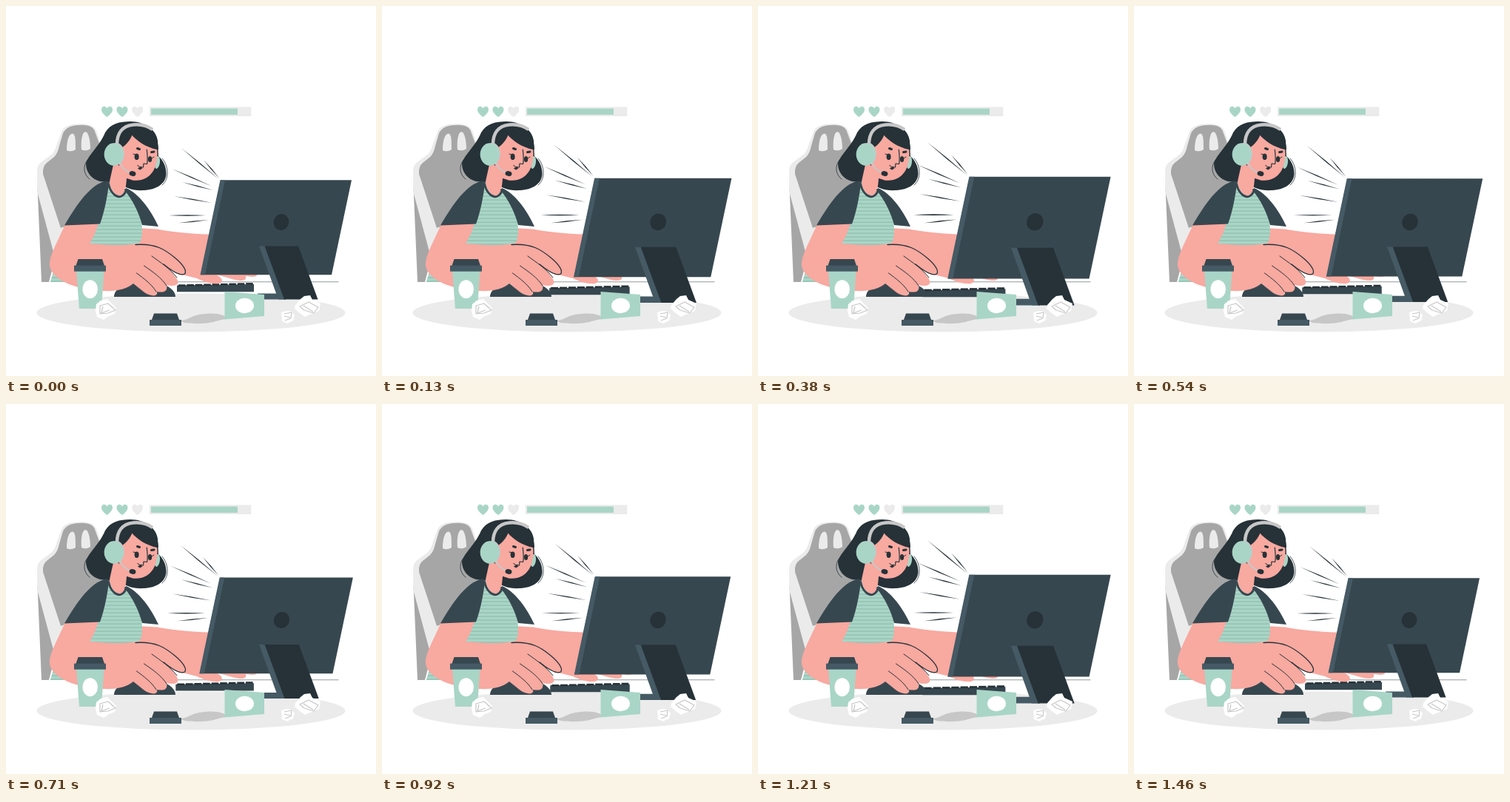
An HTML page for the animation above (1.5 s loop, 500 by 500 pixels).

```html
<!DOCTYPE html>
<html lang="en">
<head>
<meta charset="utf-8">
<title>Gamer at the desk</title>
<style>
  html, body { margin: 0; width: 100%; height: 100%; overflow: hidden; background: #fff; }
  svg { display: block; width: 100vw; height: 100vh; }
  .ink { fill: #263238; }
  .dark { fill: #37474f; }
  .slate { fill: #455a64; }
  .skin { fill: #f8a9a0; }
  .mint { fill: #a9d5c7; }
  .grey { fill: #a6a6a6; }
  .mid { fill: #c7c7c7; }
  .pale { fill: #ebebeb; }
  .white { fill: #fff; }
  .line { fill: none; stroke: #263238; stroke-width: 1; stroke-linecap: round; stroke-linejoin: round; }
  .fold { fill: none; stroke: #c7c7c7; stroke-width: 1.2; stroke-linejoin: round; }
</style>
</head>
<body>
<svg viewBox="0 0 500 500" xmlns="http://www.w3.org/2000/svg">
  <defs>
    <path id="heart" d="M0 7.4C-4 4-7.5 1-7.5-2.8C-7.5-7.6-1.8-8.4 0-4.2C1.8-8.4 7.5-7.6 7.5-2.8C7.5 1 4 4 0 7.4Z"/>
    <pattern id="stripes" width="10" height="5" patternUnits="userSpaceOnUse">
      <rect class="mint" width="10" height="5"/>
      <rect y="1.5" width="10" height="1.2" fill="#8fbdae"/>
    </pattern>
  </defs>

  <ellipse class="pale" cx="250" cy="414.5" rx="208.5" ry="26"/>

  <!-- status -->
  <use href="#heart" class="mint" x="136.5" y="142.7"/>
  <use href="#heart" class="mint" x="157" y="142.7"/>
  <use href="#heart" class="pale" x="177.7" y="142.7"/>
  <rect class="pale" x="193.7" y="136.4" width="137.6" height="12.6"/>
  <rect class="mint" x="196" y="138.5" width="117" height="8.4"/>

  <!-- chair -->
  <path class="grey" d="M42.5 245L48 373H58L72 320L62 270Z"/>
  <path class="pale" d="M42 240V224Q42 214 49 210L61 201Q66 197 68 189L75 170Q79 160 97 159.500Q117 158 122 168L142 230L85 320L64 332L43 254Z"/>
  <path class="grey" d="M50 227Q49 217 55 212L65 204Q70 199 72 189L77 172Q82 161.500 98 161Q115 159.500 119.500 168L146 240L100 290L74 300Z"/>
  <path class="pale" d="M82 195C82 182 85 172 90 172.500C94 173 94 182 94 194Q88 198 82 195ZM102 194C101 181 103 170 107.500 170C112 171 114 183 114 193Q108 197 102 194Z"/>
  <path fill="url(#stripes)" d="M66 350L59.500 373H88V360Z"/>
  <path class="line" style="stroke:#fff;stroke-width:1.500" d="M66 350L59 373"/>

  <path class="line" style="stroke-width:.5" d="M231 372.800H449"/>
  <g data-pulse><g id="keyboard"></g></g>

  <!-- far arm -->
  <path class="skin" d="M178 300L204 301.500C225 305.500 250 308 273 308.500L300 330V362C310 362 336 358 339 363C339 367 331 366 324 365C326 372 318 373 299 367L284 363C291 367 293 370 291.500 373C287 378 269 374 258 368L238 363L170 330Z"/>
  <path class="dark" d="M146 393C146 383 158 374 182 374H205C220 377 229 385 229 393Z"/>

  <!-- near arm and hand -->
  <path class="skin" d="M80 295L128 293L120 320L175 322C203 320 216 330 228 340C239 349 245 358 241.500 362C236 366 228 359 222 356L231 369C235 376 230 380 217 377C219 385 214 388 204 386C206 393 196 393 187 387L172 375C164 382 150 386 132 385C97 384 62 371 59 351C58 338 69 320 80 295Z"/>
  <path class="line" style="stroke-width:1.300" d="M175 322.500C203 320.500 216 330 228 340C239 349 245 358 241.500 362C236 365 224 358 213 349"/>
  <path class="line" d="M197 338C208 346 222 355 231 367M186.500 351C198 359 210 367 217 378M176.500 361C186 368 197 376 203 386"/>

  <!-- hair behind, neck -->
  <path class="ink" d="M108 213C111 201 126 190 134 171C141 159 154 156 168 156C187 156 203 167 205 182L206 203C212 208 217 217 216.500 228C215 241 203 248 187 249C172 250 161 246 155 240L127 237C116 234 108 225 108 213Z"/>
  <path class="line" style="stroke-width:.8" d="M113 205C104 213 103 226 113 234M211 206C220 216 221 234 211 242"/>
  <path class="skin" d="M146 210L140 237C141 249 148 257 155 256C161 254 162 246 163 233L176 235Z"/>

  <!-- shirt -->
  <path fill="url(#stripes)" d="M136 240C142 255 153 262 161 252L164 250C176 272 184 284 184 302C184 310 183 316 181 320C160 325 138 323 113 321C126 302 131 270 136 240Z"/>
  <path class="dark" d="M137 236C119 239 101 258 79 296.500L127 294.500C133 278 137 258 139 240Z"/>
  <path class="dark" d="M162 246C178 252 195 274 206 298L184 296C180 280 171 262 161 250Z"/>
  <path d="M138 239C141 253 150 260 156 257C160 255 162 251 162 247" fill="none" stroke="#37474f" stroke-width="3"/>

  <!-- face -->
  <ellipse class="mint" cx="204.300" cy="211.500" rx="3.600" ry="8.500" transform="rotate(8 204.300 211.500)"/>
  <path class="skin" d="M169 173C177 183 190 191 204 194C206 208 202 225 190 232C177 239 164 236 157 226C151 217 151 200 157 188C162 186 166 180 169 173Z"/>
  <path class="ink" d="M152 187C155 172 165 164 180 164C195 165 206 176 206 194C191 190 178 183 171 173C168 181 163 187 157 191Z"/>
  <path d="M150 187C150 172 157 162 172 160.500C182 159.500 191 162 198 167" fill="none" stroke="#c7c7c7" stroke-width="4.500"/>
  <path d="M154 211C156 219 162 223 169 226" fill="none" stroke="#c7c7c7" stroke-width="2"/>
  <ellipse class="mid" cx="149" cy="200" rx="11" ry="15"/>
  <ellipse class="mint" cx="145.700" cy="200.500" rx="13" ry="15.300"/>
  <ellipse class="ink" cx="171" cy="226.500" rx="4.500" ry="3.300" transform="rotate(12 171 226.500)"/>
  <ellipse class="ink" cx="176.600" cy="203.700" rx="3" ry="4.200"/>
  <ellipse class="ink" cx="194.600" cy="207" rx="2.600" ry="3.900"/>
  <path class="line" d="M172 200L176 201M197 206L200 204"/>
  <path class="line" style="stroke-width:3" d="M177.500 192.500L180.500 193.500M196.500 197.500L200 197"/>
  <path class="line" style="stroke-width:1.200" d="M190.300 194C191 202 192 209 190.500 213.500L186 213L185.500 218M178 215.500C180 218 182 218 184 217.500"/>
  <path class="ink" d="M178 219.500C180 217.500 183 217.500 185 219L181 221.500Z"/>

  <!-- monitor -->
  <g data-pulse>
    <g id="rays" class="ink"></g>
    <path class="dark" d="M290 235.300H467L440 363.200H263Z"/>
    <path class="slate" d="M289.500 235.300H296L269 363.200H262.500Z"/>
    <ellipse class="ink" cx="372" cy="292" rx="10.300" ry="11" transform="rotate(25 372 292)"/>
    <path class="slate" d="M340 388.500H378V396.500H340Z"/>
    <path class="slate" d="M342 324.500H351L378 396.500H368Z"/>
    <path class="ink" d="M349.500 324.500H395L421.500 396.500H376Z"/>
  </g>

  <!-- cup -->
  <path class="mint" d="M95 358H132.500L129 409H99Z"/>
  <ellipse class="white" cx="113.700" cy="382.700" rx="10.200" ry="12.500"/>
  <path class="dark" d="M94.500 351L97.500 342H130L133 351Z"/>
  <rect class="slate" x="92" y="350.700" width="43" height="8"/>

  <!-- spill, lid, fallen cup -->
  <path class="mid" d="M236 425C248 424 250 418 265 416.500C282 414 298 417 298 423C288 424 284 427 272 428.500C256 430 237 429 236 425Z"/>
  <path class="dark" d="M197 424L200 415.500H231L234 424Z"/>
  <rect class="slate" x="194" y="424" width="43" height="8"/>
  <path class="mint" d="M295.500 386L349 390V419L295.500 423.500Z"/>
  <ellipse class="white" cx="322.500" cy="405" rx="12.500" ry="10.200"/>

  <!-- paper -->
  <path class="white" d="M122 403L128 398L137 396L143 402L149 408L147 416L139 419L132 424L123 420L121 412Z"/>
  <path class="fold" d="M127 405L138 402L148 411L138 415L127 416ZM131 406L129 415L140 411"/>
  <path class="white" d="M372 414L379 412L386 413L390 418L388 425L380 429L373 426Z"/>
  <path class="fold" d="M376 416L386 414L385 422L377 425M376 419L384 421"/>
  <path class="white" d="M391 404L398 396L403 392L411 391L414 397L425 402L423 412L413 416L404 420L397 415L390 409Z"/>
  <path class="fold" d="M397 406L409 400L422 407L416 415L403 411ZM402 405L415 413"/>
</svg>
<script>
  const LOOP = 1500, STEPS = 36;
  const CX = 343, CY = 294.3;

  // Tapered speed lines: x1, y1, x2, y2
  const rays = [
    [237, 192, 287.5, 234], [267, 208, 288, 232.5], [224, 220, 278, 243.5],
    [238, 238, 280, 249], [227, 257, 278, 266], [220, 283, 270, 283], [233, 293.3, 274, 289]
  ];
  function spindle([x1, y1, x2, y2]) {
    const len = Math.hypot(x2 - x1, y2 - y1);
    const nx = (y1 - y2) / len * 1.4, ny = (x2 - x1) / len * 1.4;
    const mx = (x1 + x2) / 2, my = (y1 + y2) / 2;
    return `<path d="M${x1} ${y1}Q${mx + nx} ${my + ny} ${x2} ${y2}Q${mx - nx} ${my - ny} ${x1} ${y1}Z"/>`;
  }
  document.getElementById('rays').innerHTML = rays.map(spindle).join('');

  let keys = '<path class="dark" d="M231 377.500L335 376V386.200H231Z"/>';
  for (let i = 0; i < 9; i++) {
    const x = 233 + i * 11.4, y = 376.3 - i * 0.28;
    keys += `<path class="ink" d="M${x} ${y}h9.500v2.500h-9.500Z"/>`;
  }
  document.getElementById('keyboard').innerHTML = keys;

  // Two beats, mirrored around the middle of the loop
  function swell(step) {
    const u = Math.min(step, STEPS - 1 - step);
    if (u < 7.5) return 1.09 * Math.pow(Math.sin(Math.PI * u / 15), 1.2);
    const fall = (1 + Math.cos(Math.PI * (u - 7.5) / 10)) / 2;
    return 0.2 + 0.89 * Math.pow(fall, 1.5);
  }

  const groups = document.querySelectorAll('[data-pulse]');
  function draw(ms) {
    const step = Math.floor((ms + 2) * STEPS / LOOP) % STEPS;
    const s = 1 + 0.076 * swell(step);
    const move = `translate(${CX} ${CY}) scale(${s}) translate(${-CX} ${-CY})`;
    groups.forEach(g => g.setAttribute('transform', move));
  }

  const start = performance.now();
  function tick() {
    draw((performance.now() - start) % LOOP);
    requestAnimationFrame(tick);
  }
  draw(0);
  requestAnimationFrame(tick);
</script>
</body>
</html>
```
